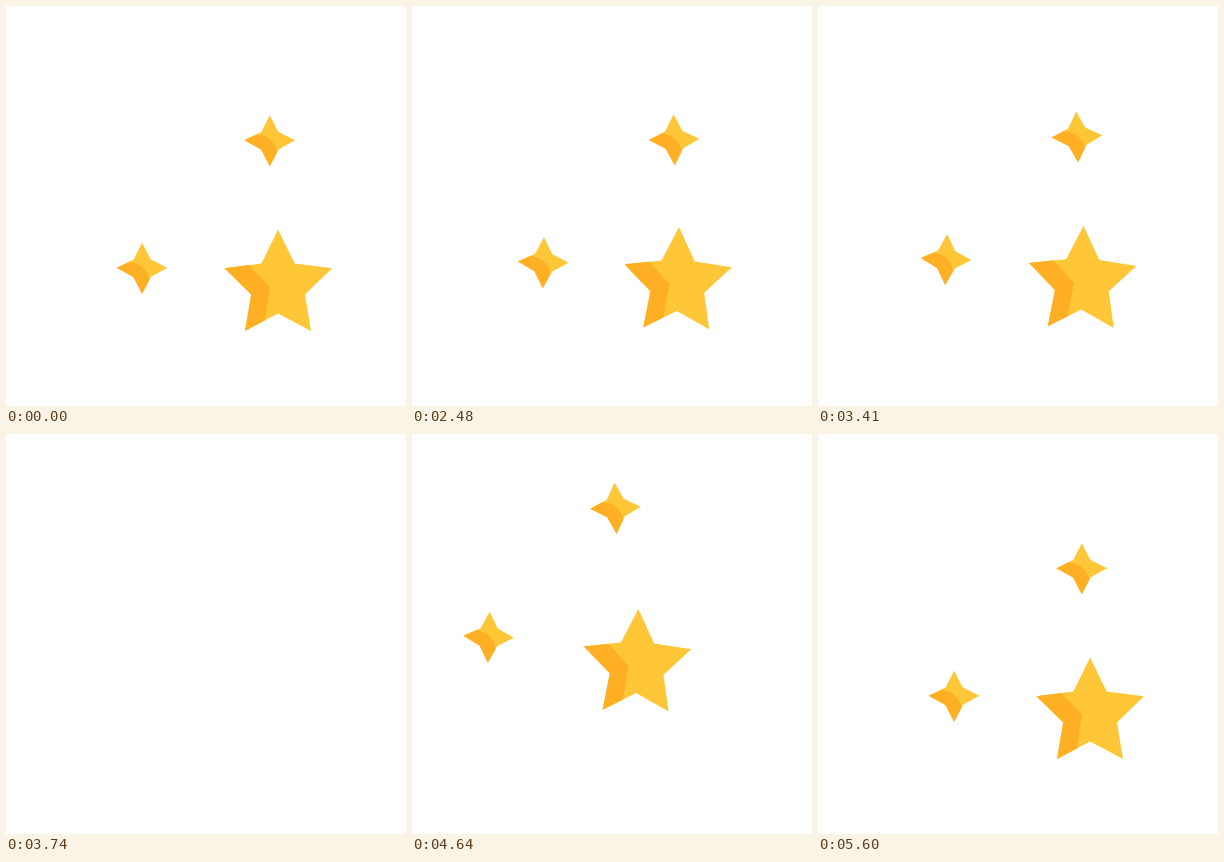
Write an HTML page that moves like this. It is 400 by 400 pixels and loops after 5.66 s.

```html
<!DOCTYPE html>
<html lang="en">
<head>
<meta charset="utf-8">
<title>Shooting stars</title>
<style>
  html, body { margin: 0; width: 100%; height: 100%; overflow: hidden; background: #fff; }
  svg { display: block; width: 100%; height: 100%; }
  .light { fill: #ffc738; }
  .dark { fill: #ffaf24; }
</style>
</head>
<body>
<svg viewBox="0 0 400 400">
  <defs>
    <g id="spark">
      <path class="light" d="M0-25 8.5-8.5 25.2 0 9 9 0 26-8.7 9.3-25.4 0-8.5-8.2Z"/>
      <path class="dark" d="M-25.4 0-13-5.9Q-3-5 1 0 6 4 7.4 11.7L0 26-8.7 9.3Z"/>
    </g>
  </defs>
  <g id="big">
    <path class="light" d="M0-56.5 16.7-22.5 54-17.7 27 8.5 33 45 0 27.5-33 45-26.8 8.5-53.5-17.7-16.5-22.5Z"/>
    <path class="dark" d="M-53.5-17.7-28.8-21-8 1-13.2 34.5-33 45-26.8 8.5Z"/>
  </g>
  <use id="top" href="#spark"/>
  <use id="left" href="#spark"/>
</svg>
<script>
  const LOOP = 5660, START = 2030, LAUNCH = 3350, GONE = 3740, END = 5600, STEP = 30;
  const SWAY = 7.7; // steps per sway

  // shake: x and y sway, turn in degrees and its period in steps
  const stars = [
    { id: 'big',  x: 272,   y: 280,   lag: 0,  pull: 7.5, sx: -1.7, sy: 2.5,  turn: -1.8, period: 6 },
    { id: 'top',  x: 263.8, y: 134.2, lag: 75, pull: 6.3, sx: 1.6,  sy: 2.5,  turn: 2.4,  period: 10 },
    { id: 'left', x: 136.1, y: 261.8, lag: 75, pull: 6.3, sx: -1.6, sy: -2.5, turn: -2.4, period: 10 }
  ];
  for (const s of stars) s.el = document.getElementById(s.id);

  const wave = (n, period) => 2 * Math.PI * n / period;

  const smooth = u => {
    u = Math.min(1, Math.max(0, u));
    return u * u * (3 - 2 * u);
  };

  // Distance along the diagonal: draw back, shoot out, glide in from the other corner
  function travel(t, s) {
    const local = t - s.lag;
    if (t >= GONE) return -161 * ((END - local) / 1440) ** 3;
    const out = Math.max(0, (local - LAUNCH) / (GONE - LAUNCH));
    return 320 * out ** 3 - s.pull * smooth((local - START) / 740);
  }

  function draw(now) {
    const time = now % LOOP;
    const n = Math.floor((time - START) / STEP);
    const t = START + n * STEP;
    for (const s of stars) {
      let { x, y } = s, angle = 0;
      if (time >= START && time < END) {
        const d = travel(t, s);
        const sway = Math.cos(wave(n, SWAY));
        x += d + s.sx * sway;
        y += d + s.sy * sway;
        angle = s.turn * Math.sin(wave(n + 1, s.period));
      }
      s.el.setAttribute('transform', `translate(${x} ${y}) rotate(${angle})`);
    }
  }

  const origin = performance.now();
  function tick() {
    draw(performance.now() - origin);
    requestAnimationFrame(tick);
  }
  tick();
</script>
</body>
</html>
```
